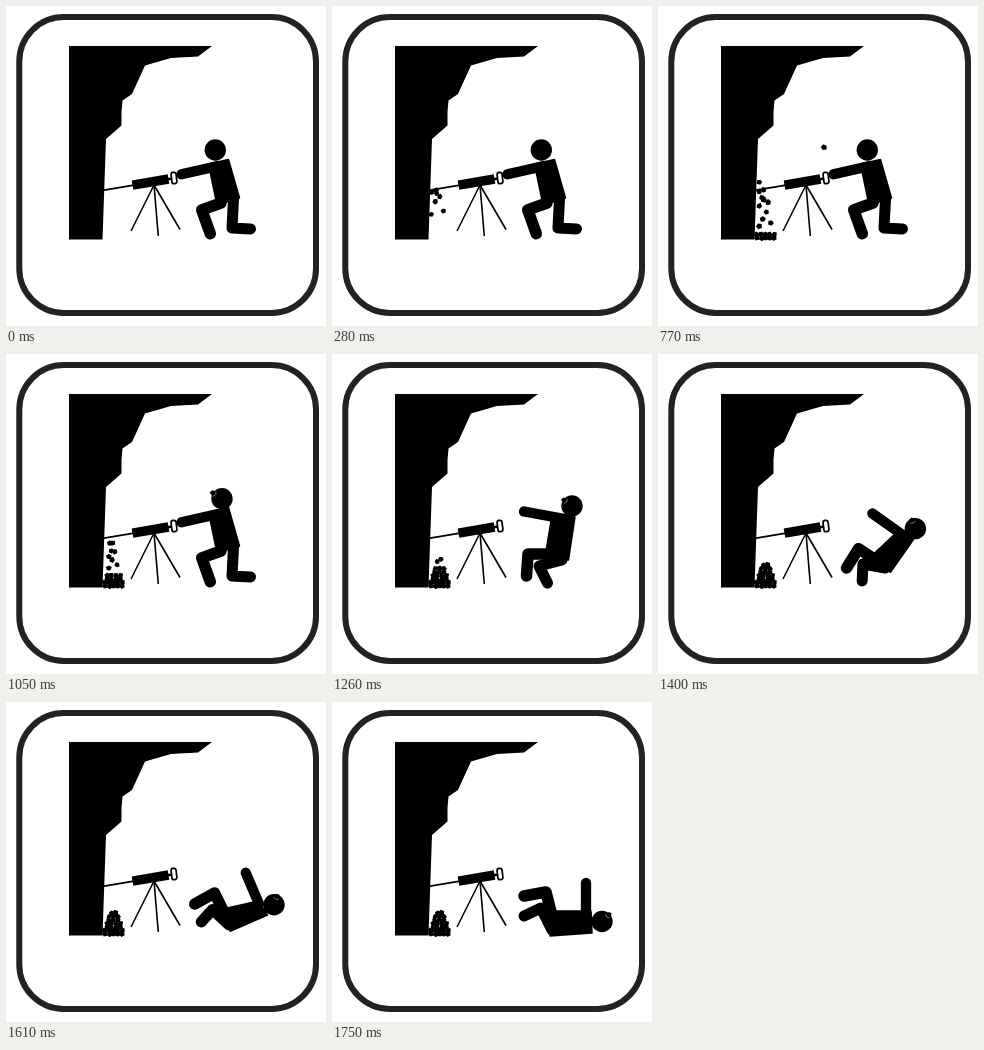
An HTML page with a canvas for the animation above (2250 ms loop, 320 px wide and 320 px high).

```html
<!DOCTYPE html>
<html lang="en">
<head>
<meta charset="utf-8">
<title>Falling rock</title>
<style>
html, body { margin: 0; width: 100%; height: 100%; overflow: hidden; background: #fff; }
canvas { display: block; width: 320px; height: 320px; }
</style>
</head>
<body>
<canvas id="stage"></canvas>
<script>
const LOOP = 2250, STEP = 70, LAST = 25;
const canvas = document.getElementById('stage');
const ctx = canvas.getContext('2d');
const ratio = window.devicePixelRatio || 1;
canvas.width = canvas.height = 320 * ratio;
ctx.scale(ratio, ratio);

const cliff = [63,40, 206,40, 192,50.5, 165,52, 139,59.5, 126,88, 116.5,94.5,
  115.5,106, 115.5,119.5, 100,133, 96.5,233.5, 63,233.5];

// Body parts as flat x,y lists; chip is relative to the head.
const kneel = {
  head: [209.3,144], chip: [-9.3,-6], arm: [175.5,168.3, 212,160],
  torso: [202.5,158, 222.5,153.5, 233.5,192, 211,199],
  front: [215,197, 195.7,203.8, 204.3,227.7], back: [227.5,193, 226,222, 244.5,223]
};
const struck = { ...kneel, head: [216,144.7] };
const tipping = {
  head: [240,152], chip: [-8,-6], arm: [192,157.5, 233,165],
  torso: [220,161, 243,163, 236.5,206, 214,197],
  front: [219,200, 196,200, 194.5,222], back: [230,206, 207,212, 215.5,229]
};
const falling = {
  head: [266,186], chip: [-1,-10], arm: [225.5,160.5, 252,190],
  torso: [246,189, 263,195, 230.5,224.5, 214,204],
  front: [217,209, 203,192, 185.5,210], back: [226,218, 204,209, 198.5,226]
};
const lying = {
  head: [270,219.5], chip: [7,-7], arm: [254,181, 254,214],
  torso: [259,209, 260,231, 218,234, 224,209],
  front: [220,214, 214,190, 192,194], back: [220,228, 209,206, 192,214]
};
const keys = [[0, kneel], [13, kneel], [15, struck], [18, tipping], [21, falling], [25, lying]];

function noise(n) {
  const v = Math.sin(n * 12.9898 + 4.1) * 43758.5453;
  return v - Math.floor(v);
}

function path(p, close) {
  ctx.beginPath();
  for (let i = 0; i < p.length; i += 2) ctx.lineTo(p[i], p[i + 1]);
  if (close) ctx.closePath();
}
function fill(p) { path(p, true); ctx.fill(); }
function line(p, width) { path(p); ctx.lineWidth = width; ctx.stroke(); }

function rock(x, y, seed, size = 3) {
  const p = [];
  for (let i = 0; i < 5; i++) {
    const a = seed + i * Math.PI * 2 / 5;
    const r = size * (0.85 + 0.3 * noise(seed * 9 + i));
    p.push(x + r * Math.cos(a), y + r * Math.sin(a));
  }
  fill(p);
}

// Pile slots, filled from the bottom row up and from both sides inwards.
const debris = [];
[5, 5, 4, 4, 3, 3, 2].forEach((count, row) => {
  for (let c = 0; c < count; c++) {
    const i = debris.length;
    const slot = c % 2 ? count - 1 - (c >> 1) : c >> 1;
    debris.push({
      born: 1 + i * 0.5,
      x0: 99 + 4 * noise(i), y0: 171 + 11 * noise(i + 40),
      x1: 107.5 + (slot - (count - 1) / 2) * 4.3 + noise(i + 80) - 0.5,
      y1: 232 - row * 3.5
    });
  }
});

function drawDebris(s) {
  debris.forEach((d, i) => {
    if (s < d.born) return;
    const k = Math.min(1, (s - d.born + 0.5) / 6);
    const x = d.x0 + (d.x1 - d.x0) * Math.sqrt(k);
    const y = d.y0 + (d.y1 - d.y0) * Math.pow(k, 1.1);
    rock(x, y, i + k * 2);
  });
}

function poseAt(s) {
  let i = 0;
  while (i < keys.length - 2 && s >= keys[i + 1][0]) i++;
  const [s0, a] = keys[i], [s1, b] = keys[i + 1];
  const k = (s - s0) / (s1 - s0), pose = {};
  for (const part in a) pose[part] = a[part].map((v, j) => v + (b[part][j] - v) * k);
  return pose;
}

function drawMan(s) {
  const p = poseAt(s), [x, y] = p.head;
  ctx.lineCap = ctx.lineJoin = 'round';
  fill(p.torso);
  line(p.torso.concat(p.torso.slice(0, 2)), 1.5);
  line(p.arm, 10.3);
  line(p.front, 11.5);
  line(p.back, 11);
  ctx.beginPath();
  ctx.arc(x, y, 10.7, 0, Math.PI * 2);
  ctx.fill();
  if (s >= 14) {
    const cx = x + p.chip[0], cy = y + p.chip[1];
    const a = Math.atan2(-p.chip[1], -p.chip[0]);
    ctx.strokeStyle = '#fff';
    ctx.lineWidth = 0.5;
    ctx.beginPath();
    ctx.arc(cx, cy, 3.3, a - 0.8, a + 0.8);
    ctx.stroke();
    ctx.strokeStyle = '#000';
    rock(cx, cy, 2);
  }
}

function drawFlyingRock(s) {
  const u = s - 6;
  if (u < 0 || s >= 14) return;
  rock(98 + 13.6 * u, 181 - 12.2 * u + 0.854 * u * u, 2 + u);
}

function drawDrill() {
  ctx.lineCap = 'butt';
  line([98,184.2, 128,179.2], 1.8);
  line([126.5,179.2, 162.5,173], 9.4);
  line([162,173.2, 166,172.5], 2.5);
  for (const foot of [[125,225], [152.3,230], [174,223.5]]) line([148,179, ...foot], 1.6);
  ctx.save();
  ctx.translate(168, 172);
  ctx.rotate(-0.12);
  ctx.lineWidth = 1.7;
  ctx.beginPath();
  ctx.roundRect(-2.5, -5.7, 5, 11.4, 2.2);
  ctx.stroke();
  ctx.restore();
}

function draw(ms) {
  const s = Math.min(LAST, Math.floor((ms % LOOP) / STEP));
  ctx.fillStyle = '#fff';
  ctx.fillRect(0, 0, 320, 320);
  ctx.strokeStyle = '#222';
  ctx.lineWidth = 6;
  ctx.beginPath();
  ctx.roundRect(13.3, 11, 296.7, 296, 44.5);
  ctx.stroke();
  ctx.fillStyle = ctx.strokeStyle = '#000';
  fill(cliff);
  drawMan(s);
  drawDrill();
  drawDebris(s);
  drawFlyingRock(s);
}

const start = performance.now();
function tick() {
  draw(performance.now() - start);
  requestAnimationFrame(tick);
}
tick();
</script>
</body>
</html>
```
